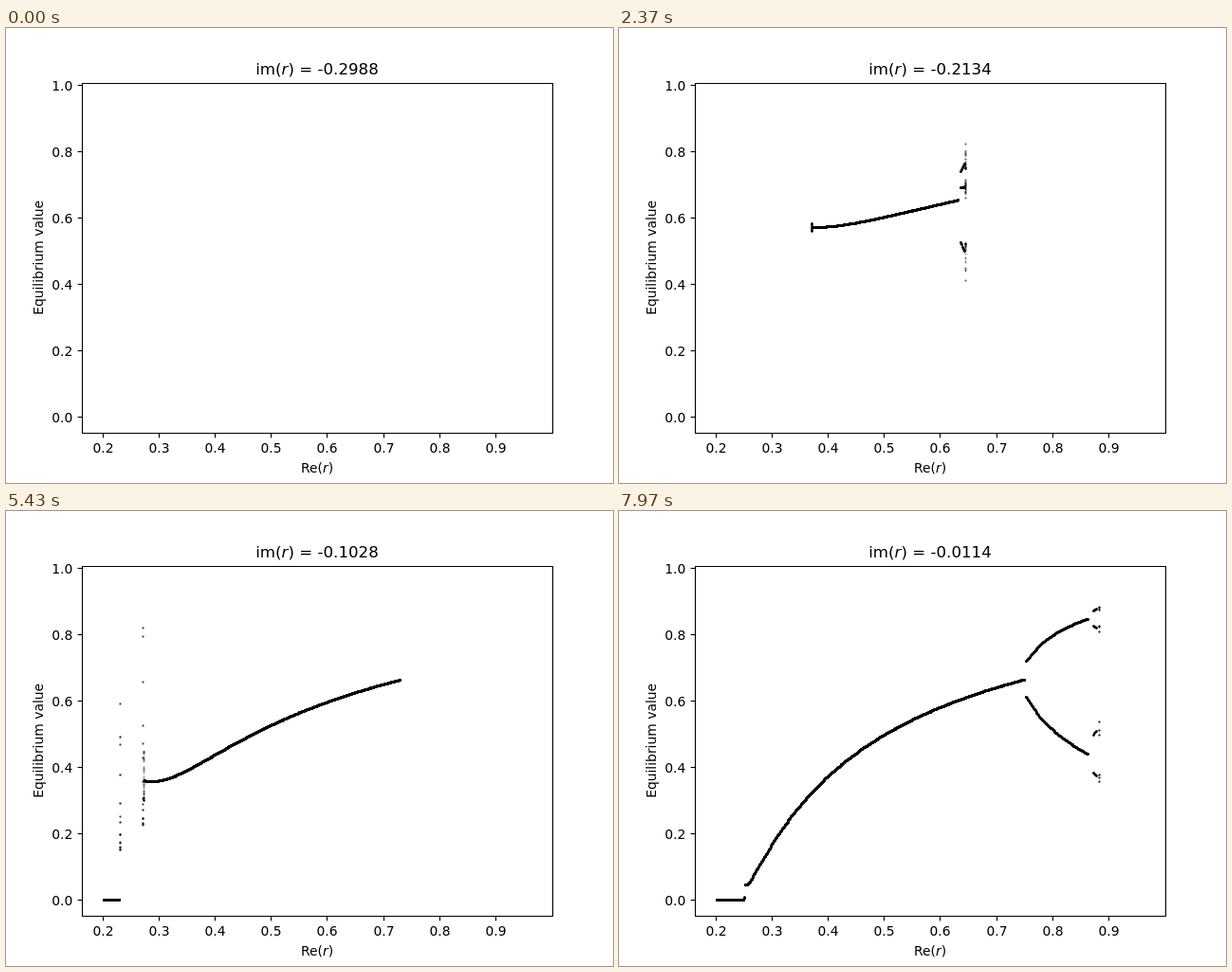
An HTML page with a canvas for the animation above (8000 ms loop, 640 by 480 pixels).

```html
<!DOCTYPE html>
<html lang="en">
<head>
<meta charset="utf-8">
<title>Complex logistic map</title>
<style>
  html, body { margin: 0; width: 100%; height: 100%; overflow: hidden; background: #fff; }
  canvas, svg { position: absolute; left: 0; top: 0; width: 640px; height: 480px; }
  text { font: 13.89px "DejaVu Sans", sans-serif; fill: #000; text-anchor: middle; white-space: pre; }
  text.end { text-anchor: end; }
  text.title { font-size: 16.67px; }
  .var { font-style: italic; }
  path { fill: none; stroke: #000; stroke-width: 1.11; }
</style>
</head>
<body>
<canvas id="plot" width="640" height="480"></canvas>
<svg id="axes" viewBox="0 0 640 480">
  <path d="M80.5 58.5H576.5V427.5H80.5Z"/>
  <text class="title" x="328" y="49">im(<tspan class="var">r</tspan>) = <tspan id="value"></tspan></text>
  <text x="328" y="469">Re(<tspan class="var">r</tspan>)</text>
  <text transform="translate(39 242.4) rotate(-90)">Equilibrium value</text>
</svg>
<script>
const W = 640, H = 480;
const LOOP = 8000, FRAME = 100 / 3;
const GRID = 499;             // intervals along both parts of r
const ITERATIONS = 10000, KEPT = 50;
const ALPHA = 0.35;

const scaleX = 450.91 / 0.76152, scaleY = 336 / 0.9615;
const toX = re => 102.545 + (re - 0.2) * scaleX;
const toY = size => 410.4 - size * scaleY;

// Pixel coverage of a round marker about two pixels wide.
const stamp = [];
for (let dy = -1; dy <= 1; dy++)
  for (let dx = -1; dx <= 1; dx++)
    stamp.push([dy * W + dx, 1 - ALPHA * [1, 0.49, 0.11][Math.abs(dx) + Math.abs(dy)]]);

const ctx = document.getElementById('plot').getContext('2d');
const image = ctx.createImageData(W, H);
const value = document.getElementById('value');
const light = new Float32Array(W * H);

function drawAxes() {
  const axes = document.getElementById('axes');
  let marks = '';
  for (let i = 2; i <= 9; i++) {
    const x = Math.floor(toX(i / 10) + 0.5) - 0.5;
    marks += `<path d="M${x} 427.5v4.9"/><text x="${x}" y="448">0.${i}</text>`;
  }
  for (let i = 0; i <= 10; i += 2) {
    const y = Math.floor(toY(i / 10)) + 0.5;
    marks += `<path d="M80.5 ${y}h-4.9"/><text class="end" x="70.3" y="${y + 5}">${(i / 10).toFixed(1)}</text>`;
  }
  axes.insertAdjacentHTML('beforeend', marks);
}

// Late orbit sizes of z -> 4 r z (1 - z) from z = 1/2; empty when it escapes.
function settledOrbit(re, im) {
  const a = 4 * re, b = 4 * im;
  let x = 0.5, y = 0, savedX = 9, savedY = 9, nextSave = 16;
  const step = () => {
    const u = x - x * x + y * y, v = y - 2 * x * y;
    x = a * u - b * v;
    y = a * v + b * u;
  };
  for (let i = 1; i <= ITERATIONS - KEPT; i++) {
    step();
    if (x * x + y * y > 100) return [];
    if (Math.abs(x - savedX) + Math.abs(y - savedY) < 1e-11) break;
    if (i === nextSave) {
      savedX = x;
      savedY = y;
      nextSave *= 2;
    }
  }
  const sizes = [];
  for (let i = 0; i < KEPT; i++) {
    step();
    sizes.push(Math.hypot(x, y));
  }
  return sizes;
}

function drawFrame(n) {
  const im = -0.3 + 0.6 * (n + 1) / GRID;
  value.textContent = im.toFixed(4);
  light.fill(1);
  for (let k = 0; k <= GRID; k++) {
    const re = 0.2 + 0.8 * k / GRID;
    const column = Math.round(toX(re));
    for (const size of settledOrbit(re, im)) {
      const row = Math.round(toY(size));
      if (!(row > 59 && row < 426) || column > 574) continue;
      for (const [offset, pass] of stamp) light[row * W + column + offset] *= pass;
    }
  }
  for (let i = 0; i < light.length; i++) {
    image.data[4 * i + 3] = 255 * (1 - light[i]);
  }
  ctx.putImageData(image, 0, 0);
}

let shown = -1;
const start = performance.now();
function tick() {
  const t = Math.max(0, performance.now() - start) % LOOP;
  const n = Math.min(239, Math.floor((Math.floor(t / 10) * 10 + 5) / FRAME));
  if (n !== shown) drawFrame(shown = n);
  requestAnimationFrame(tick);
}

drawAxes();
tick();
</script>
</body>
</html>
```
